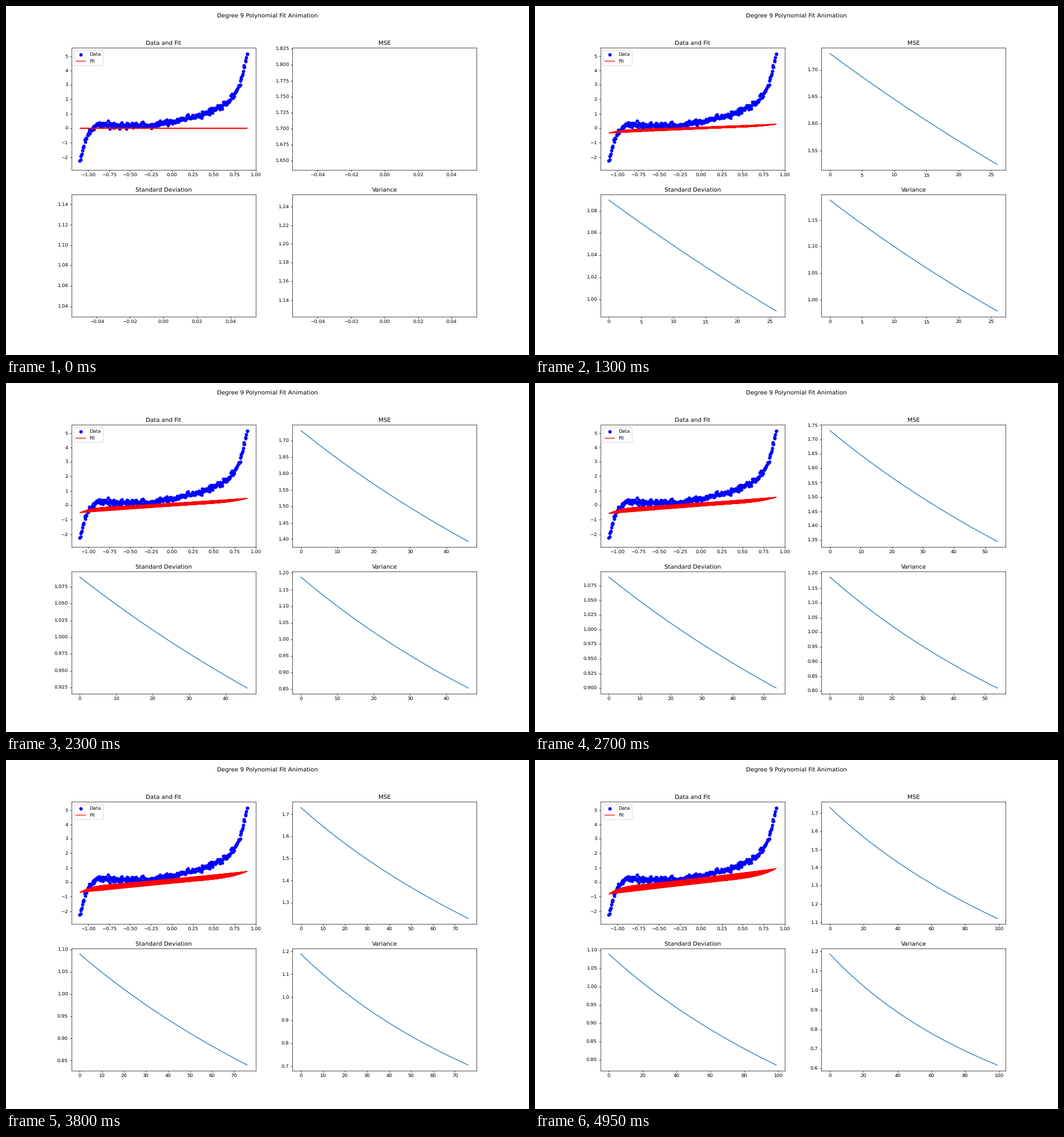
Recreate the animation shown at these times as a matplotlib script. Size 917 by 611 pixels, loop 5000 ms.

```python
import matplotlib.pyplot as plt
import numpy as np
from matplotlib.animation import FuncAnimation

WIDTH, HEIGHT, DPI = 917, 611, 917 / 15
FRAMES, INTERVAL = 100, 50
DEGREE, SAMPLES = 9, 320
X_MIN, X_MAX = -1.1, 0.9
MEAN, SPREAD = 0.737, 1.094  # of the data's y values
FIRST_DROP = 0.009  # how far the first step lowers the squared error

plt.rcParams["text.hinting"] = "none"


def make_data():
    """Noisy points, flat in the middle and steep at both ends, unsorted."""
    rng = np.random.default_rng(4)
    x = np.linspace(X_MIN, X_MAX, SAMPLES)
    x[1:-1] += rng.uniform(-0.006, 0.006, SAMPLES - 2)
    u = x - (X_MIN + X_MAX) / 2
    y = 0.33 + 0.85 * u + 1.15 * u**2 + 3.05 * u**11
    y += rng.normal(0, 0.1, SAMPLES)
    y = np.clip(y, -2.5, 5.18)
    y = MEAN + SPREAD * (y - y.mean()) / y.std()
    order = rng.permutation(SAMPLES)
    return x[order], y[order]


def descend(x, y):
    """Fitted values after each gradient step, starting from zero weights."""
    powers = x[:, None] ** np.arange(1, DEGREE + 1)
    weights = np.zeros(DEGREE)

    def gradient():
        return 2 * powers.T @ (y - powers @ weights) / len(x)

    rate = FIRST_DROP / np.sum(gradient() ** 2)
    fits = []
    for _ in range(FRAMES):
        weights = weights + rate * gradient()
        fits.append(powers @ weights)
    return np.array(fits)


x, y = make_data()
fits = descend(x, y)
errors = y - fits

size = ((WIDTH + 1e-3) / DPI, (HEIGHT + 1e-3) / DPI)
fig, axes = plt.subplots(2, 2, figsize=size, dpi=DPI)
fig.suptitle("Degree 9 Polynomial Fit Animation")
data_ax, *chart_axes = axes.flat

data_ax.set_title("Data and Fit")
data_ax.scatter(x, y, color="blue", label="Data")
fit_line, = data_ax.plot(x, fits[0], color="red", label="Fit")
data_ax.set(xlim=(-1.2, 1.0), ylim=(-2.894, 5.563))
data_ax.legend(loc="upper left")

metrics = {
    "MSE": np.mean(errors**2, axis=1),
    "Standard Deviation": errors.std(axis=1),
    "Variance": errors.var(axis=1),
}
charts = []
for ax, (title, values) in zip(chart_axes, metrics.items()):
    ax.set_title(title)
    charts.append((ax, ax.plot([], [])[0], values))


def update(frame):
    fit_line.set_ydata(fits[frame])
    count = frame + 1
    for ax, line, values in charts:
        line.set_data(np.arange(count), values[:count])
        ax.relim()
        ax.autoscale_view()
    return [fit_line] + [line for _, line, _ in charts]


anim = FuncAnimation(fig, update, frames=FRAMES, interval=INTERVAL,
                     repeat=True, repeat_delay=0)
plt.show()
```
